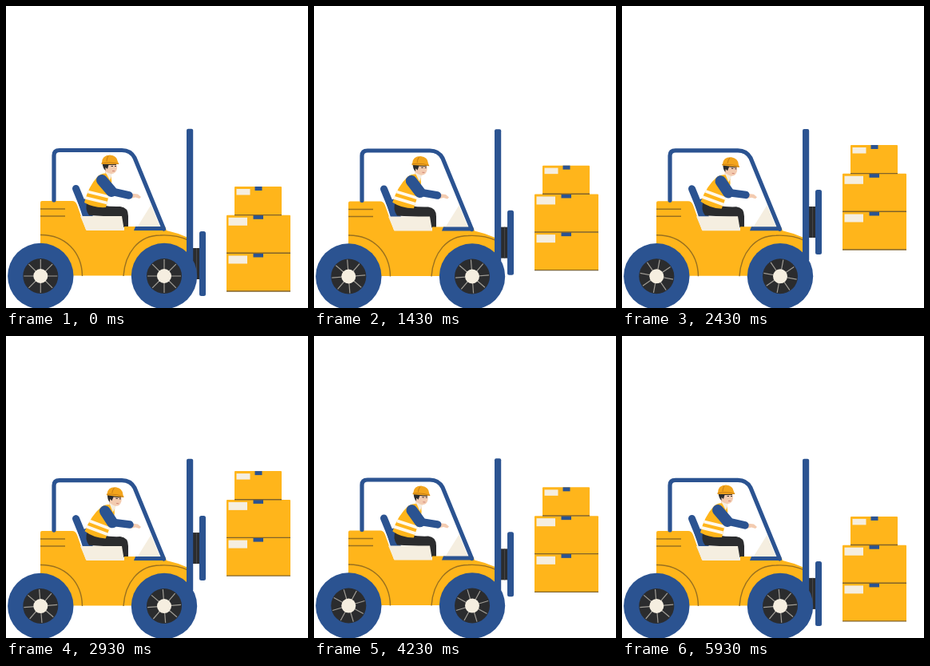
An HTML page that plays this animation: 378 by 378 pixels, repeating every 6.01 s.

```html
<!DOCTYPE html>
<html lang="en">
<head>
<meta charset="utf-8">
<title>Forklift</title>
<style>
  html, body { margin: 0; width: 100%; height: 100%; overflow: hidden; background: #fff; }
  svg { display: block; width: 100%; height: 100%; }
  .blue { fill: #2b5391; }
  .yellow { fill: #ffb51b; }
  .cream { fill: #f5eee0; }
  .dark { fill: #2b2c2e; }
  .skin { fill: #f3cbb0; }
  .line { fill: none; stroke: #99701f; stroke-width: 1.4; }
  .seam { stroke: #80632a; stroke-width: 1.4; }
  .bar { fill: none; stroke: #2b5391; stroke-linecap: round; stroke-linejoin: round; }
</style>
</head>
<body>
<svg viewBox="0 0 378 378">
  <defs>
    <g id="wheel">
      <circle class="blue" r="41.200"/>
      <circle class="dark" r="22"/>
      <path id="spokes" fill="none" stroke="#a19e97" stroke-width="1.2"/>
      <circle class="cream" r="9"/>
    </g>
  </defs>

  <g id="load">
    <g id="fork">
      <rect class="dark" x="231" y="303" width="11.5" height="39"/>
      <path d="M238.500 303V342" stroke="#45474a"/>
      <rect class="blue" x="242" y="282" width="8" height="81" rx="2.500"/>
    </g>
    <g id="boxes"></g>
  </g>

  <g id="truck">
    <path class="bar" stroke-width="9" d="M87.500 228.500L100 259"/>
    <path class="blue" d="M90 245L102 240L109 264H96Z"/>

    <path class="dark" d="M102 244Q122 252 143 251Q153 252 153 263V277H143L140 264L104 262Q98 254 102 244Z"/>
    <g id="torso">
      <path class="skin" d="M124 204H132V215H124Z"/>
      <path class="yellow" d="M115 213Q122 207 130 211Q134 218 131 229L125 252Q110 253 98 246Q103 226 115 213Z"/>
      <path d="M102.500 232.500L129 239M99.500 240L126.500 246.500" stroke="#fff8ea" stroke-width="3.800"/>
      <path class="cream" d="M124 207L133 210L130 218Z"/>
      <path class="skin" d="M122 196H138L139 203Q138 210 132 210Q125 209 122 202Z"/>
      <path class="dark" d="M120.500 196H138V199H128.500L127 204L124.500 202V206Q121 203 120.500 196Z"/>
      <path d="M131.500 200.500H134M136 200.500H138" stroke="#343033"/>
      <path d="M133 206.500H136" stroke="#c87568" stroke-width=".8"/>
      <path fill="#f3a51c" d="M120 196Q120 187 130 186.500Q139 187 140 195L141.500 198H119.500Z"/>
      <path d="M119.500 197Q130 194.500 141 197.500M128 187.500Q126 191 126 194.500" fill="none" stroke="#c87f16"/>
    </g>
    <path class="skin" d="M156 234.500L165 235.500L169 239L167 241L162 239.500L156 241Z"/>
    <path class="bar" id="upper" stroke-width="14"/>
    <path class="bar" id="lower" stroke-width="9.500"/>

    <path class="yellow" d="M43 246Q43 244 45 244H83Q87 244 89 249L100 280H148V276H199L201 281Q215 284 228 290V318L198 337.500H43Z"/>
    <path class="cream" d="M93 263H145L148 281H100.500Z"/>
    <path class="cream" d="M164 277L181.500 249L193 277Z"/>
    <path class="bar" stroke-width="5.200" d="M60 243V187Q60 180.500 67 180.500H145Q156 180.500 161 190Q169 209 197.500 279"/>
    <path class="blue" d="M162 276H197L200 281H160Z"/>
    <path class="line" d="M43 254H74M43 263H74M43 286.500C74 286 95 308 95.500 338M147 338C149 309 166 287 193 287Q213 286 228 293"/>
    <rect class="blue" x="226" y="153.700" width="8.200" height="166" rx="2"/>

    <use href="#wheel" x="43.300" y="338"/>
    <use href="#wheel" x="198" y="338"/>
  </g>
</svg>
<script>
  const $ = id => document.getElementById(id);
  const LOOP = 6010, LAST = 5930, LIFT = 57, LEAN = 7;
  const hip = [112, 250];

  const box = (x, y, w, h, labelX, labelW, labelH, tabX, tabW) => `
    <rect class="yellow" x="${x}" y="${y}" width="${w}" height="${h}" rx="1"/>
    <path class="seam" d="M${x} ${y + h}h${w}"/>
    <rect class="cream" x="${labelX}" y="${y + 3}" width="${labelW}" height="${labelH}"/>
    <rect class="blue" x="${tabX}" y="${y}" width="${tabW}" height="5"/>`;

  $('boxes').innerHTML =
    box(276, 309.5, 80, 47.5, 278.5, 23.5, 10, 309.5, 12.5) +
    box(276, 261.8, 80, 47.5, 278.5, 23.5, 10, 309.5, 12.5) +
    box(286, 226, 59, 35.6, 288.5, 17, 7.5, 311.5, 9);

  $('spokes').setAttribute('d', Array.from({ length: 8 }, (_, i) => {
    const a = i * Math.PI / 4;
    return `M0 0L${21 * Math.cos(a)} ${21 * Math.sin(a)}`;
  }).join(''));

  // Steps alternate between 30 and 70 ms.
  const stepTime = t => Math.min(LAST, 100 * Math.floor(t / 100) + (t % 100 >= 30 ? 30 : 0));

  function swing([x, y], degrees) {
    const a = degrees * Math.PI / 180, dx = x - hip[0], dy = y - hip[1];
    return [hip[0] + dx * Math.cos(a) - dy * Math.sin(a),
            hip[1] + dx * Math.sin(a) + dy * Math.cos(a)];
  }

  function draw(now) {
    const phase = stepTime(now % LOOP) / LOOP;
    const angle = phase * 2 * Math.PI;
    const rise = (1 - Math.cos(angle)) / 2;
    const lean = LEAN * rise;

    $('load').setAttribute('transform', `translate(0 ${-LIFT * rise})`);
    $('truck').setAttribute('transform', `translate(0 ${0.5 * Math.sin(angle)})`);
    $('torso').setAttribute('transform', `rotate(${lean} ${hip})`);
    $('spokes').setAttribute('transform', `rotate(${360 * phase})`);

    const shoulder = swing([120, 218], lean), elbow = swing([132, 232], lean * 0.5);
    const hand = [154 + rise, 237 - rise];
    $('upper').setAttribute('d', `M${shoulder}L${elbow}`);
    $('lower').setAttribute('d', `M${elbow}L${hand}`);
  }

  const start = performance.now();
  function loop() {
    draw(performance.now() - start);
    requestAnimationFrame(loop);
  }
  loop();
</script>
</body>
</html>
```
